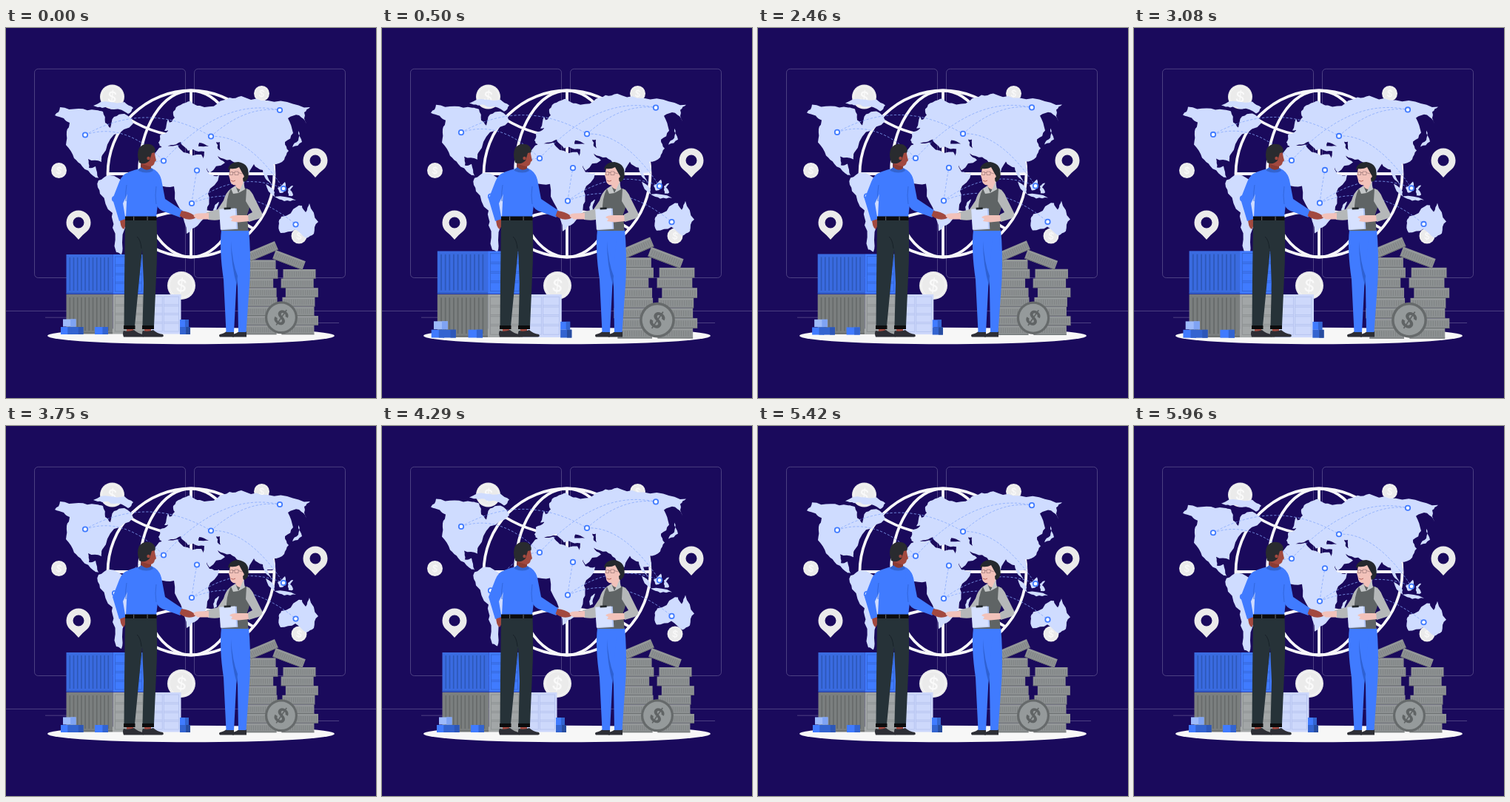
An HTML page with a canvas for the animation above (6 s loop, 500 by 500 pixels).

```html
<!DOCTYPE html>
<html lang="en">
<head>
<meta charset="utf-8">
<title>Global trade</title>
<style>
html, body { margin: 0; width: 100%; height: 100%; overflow: hidden; background: #1a0a5c; }
canvas { display: block; width: 500px; height: 500px; }
</style>
</head>
<body>
<canvas id="stage"></canvas>
<script>
const cv = document.getElementById('stage');
const dpr = window.devicePixelRatio || 1;
cv.width = cv.height = 500 * dpr;
const c = cv.getContext('2d');

const NIGHT = '#1a0a5c', BLUE = '#407bff', DEEP = '#3364d0', PALE = '#cfdcff';
const INK = '#263238', BLACK = '#0c0c0e', BROWN = '#a2493f', PINK = '#f2c2ba';
const SHOE = '#2d2e35', HAIR = '#24292e', SLEEVE = '#b5b8b9', VEST = '#5f6465';
const LOOP = 6000, FLOAT = 3000, ROW = 12.6;

// ---------- helpers ----------
function fill(color, d) {
  c.fillStyle = color;
  c.fill(typeof d === 'string' ? new Path2D(d) : d, 'evenodd');
}
function line(color, width, d) {
  c.strokeStyle = color;
  c.lineWidth = width;
  c.stroke(new Path2D(d));
}
function rect(color, x, y, w, h) {
  c.fillStyle = color;
  c.fillRect(x, y, w, h);
}
function oval(x, y, rx, ry) {
  c.beginPath();
  c.ellipse(x, y, rx, ry, 0, 0, 7);
}
function disc(color, x, y, rx, ry = rx) {
  c.fillStyle = color;
  oval(x, y, rx, ry);
  c.fill();
}
function ring(color, width, x, y, rx, ry = rx) {
  c.strokeStyle = color;
  c.lineWidth = width;
  oval(x, y, rx, ry);
  c.stroke();
}
function turned(x, y, angle, draw) {
  c.save();
  c.translate(x, y);
  c.rotate(angle);
  draw();
  c.restore();
}
function zoomed(x, y, s, draw) {
  c.save();
  c.translate(x, y);
  c.scale(s, s);
  c.translate(-x, -y);
  draw();
  c.restore();
}
function dollar(color, x, y, size, angle, weight) {
  turned(x, y, angle, () => {
    c.fillStyle = color;
    c.font = `${weight} ${size}px Inter, Arial, sans-serif`;
    c.textAlign = 'center';
    c.fillText('$', 0, size * 0.36);
  });
}

// ---------- motion ----------
// The map drifts up 10 px and back at a steady pace
const floatY = t => 10 * Math.abs(2 * (t % FLOAT) / FLOAT - 1) - 10;

// Two beats per loop: quick swell to 1.1, slower return
function beat(t) {
  const p = t / LOOP;
  const rise = p < 0.25 ? p / 0.1 : (p - 0.4) / 0.1;
  const fall = p < 0.35 ? (0.3 - p) / 0.2 : (0.6 - p) / 0.1;
  return 1 + 0.1 * Math.max(0, Math.min(rise, fall, 1));
}

// ---------- map ----------
let seed = 7;
const rnd = () => (seed = (seed * 16807) % 2147483647) / 2147483647 - 0.5;

// Splits each edge at a shifted midpoint to make a ragged coast
function edge(path, x, y, u, v, depth) {
  if (!depth) return path.lineTo(u, v);
  const bend = rnd() * 0.28;
  const mx = (x + u) / 2 + (v - y) * bend, my = (y + v) / 2 - (u - x) * bend;
  edge(path, x, y, mx, my, depth - 1);
  edge(path, mx, my, u, v, depth - 1);
}
function coast(text) {
  const pts = text.split(' ').map(p => p.split(',').map(Number));
  const path = new Path2D();
  path.moveTo(...pts[0]);
  pts.forEach((p, i) => edge(path, ...p, ...pts[(i + 1) % pts.length], 2));
  return path;
}
const LAND = {
  northAmerica: '66,118 73,107 98,109 122,111 131,113 134,128 141,135 146,120 160,116 172,129 146,144 130,172 129,181 111,177 112,189 121,187 125,203 118,200 103,187 92,176 81,158 82,140 86,128 78,122',
  arctic: '118,105 140,100 160,100 172,108 165,116 146,110 130,108',
  southAmerica: '125,206 140,199 160,211 184,229 176,253 157,290 156,306 149,303 144,270 144,250 127,224',
  africa: '207,162 232,158 240,168 264,171 275,198 288,199 273,224 272,242 259,267 244,278 236,246 227,214 206,214 190,194',
  madagascar: '282,240 288,235 285,249 281,251',
  britain: '214,139 219,123 224,136',
  eurasia: '206,155 208,145 219,139 218,130 228,121 226,113 236,104 250,99 262,105 286,102 302,94 318,92 345,98 380,100 411,107 403,114 406,130 396,118 381,122 388,142 377,154 382,166 376,178 361,184 364,197 353,199 359,211 351,204 347,192 335,184 324,203 315,187 303,178 286,173 296,182 275,196 267,178 268,167 253,164 246,166 236,154 223,158 211,162',
  japan: '395,139 400,154 387,161 395,152',
  sumatra: '351,211 363,222 363,228',
  java: '363,228 392,233 376,234',
  borneo: '367,216 377,208 378,220 370,223',
  sulawesi: '381,217 388,213 384,219 388,226 382,227',
  australia: '369,264 372,255 394,241 400,240 405,249 410,237 422,262 416,278 406,284 391,272 371,277',
};
const SHORES = Object.values(LAND).map(coast);
const BLACK_SEA = coast('260,160 261,155 274,160');
const CASPIAN = coast('284,154 289,154 290,166 286,163');

const NODES = { america: [107, 144.5], europe: [277, 146.5], siberia: [370, 111], brazil: [147, 231],
  mali: [213, 179.5], sudan: [258, 192.5], congo: [251, 237], borneo: [375, 217], oz: [391.5, 265.5] };
const ROUTES = [['america', 'europe', 49], ['america', 'mali', 36], ['mali', 'siberia', 52],
  ['europe', 'siberia', 24], ['europe', 'borneo', 38], ['brazil', 'mali', 26], ['congo', 'sudan', 4],
  ['congo', 'borneo', 36], ['congo', 'oz', 44]];

function worldMap() {
  SHORES.forEach(p => fill(PALE, p));
  fill(NIGHT, BLACK_SEA);
  fill(NIGHT, CASPIAN);
  c.setLineDash([3.2, 2.2]);
  for (const [from, to, lift] of ROUTES) {
    const [x, y] = NODES[from], [u, v] = NODES[to];
    line('#86a9fb', 0.8, `M${x} ${y}Q${(x + u) / 2} ${(y + v) / 2 - lift} ${u} ${v}`);
  }
  c.setLineDash([]);
  for (const [x, y] of Object.values(NODES)) {
    disc(BLUE, x, y, 4.1);
    disc('#fff', x, y, 2.3);
  }
}

// ---------- backdrop ----------
function paleCoin(x, y, r) {
  disc('#ebebeb', x, y, r);
  ring('#f5f5f5', r * 0.07, x, y, r * 0.85);
  dollar('#fafafa', x, y, r * 1.2, 0.12, 500);
}
function pin(x, y) {
  fill('#ebebeb', `M${x} ${y + 23}q-5 -6 -12 -11.700a16.500 16.500 0 1 1 24 0q-7 5.700 -12 11.700Z
    M${x - 7.5} ${y}a7.5 7.5 0 0 0 15 0a7.5 7.5 0 0 0 -15 0Z`);
}
function globe(color) {
  ring(color, 3.8, 250, 197, 112.5);
  ring(color, 3.8, 250, 197, 70, 112.5);
  line(color, 3.8, 'M250 84V310M137 197H363M166 123Q205 147 250 147T334 123M166 271Q205 247 250 247T334 271');
}
function backdrop() {
  rect(NIGHT, 0, 0, 500, 500);
  for (const x of [38.5, 254.5]) {
    c.beginPath();
    c.roundRect(x, 55.3, 204, 282.2, 5);
    c.strokeStyle = '#5a4f8c';
    c.lineWidth = 0.8;
    c.stroke();
  }
  line('#5a4f8c', 0.8, 'M0 382.4H500M53 391.2H86M400 398.5H450');
  globe('#f7f7f9');
  paleCoin(143.5, 93, 16.5);
  paleCoin(345.5, 88.5, 10.5);
  paleCoin(71.5, 192.5, 10.5);
  paleCoin(396, 281, 10.5);
  paleCoin(237, 348, 19);
  pin(418, 179);
  pin(98, 263);
}

// ---------- cargo ----------
function side(x, y, base, dark) {
  rect(base, x, y, 63, 53.5);
  for (let i = 4; i < 60; i += 5.2) rect(dark, x + i, y + 4, 1.6, 45);
  rect(dark, x, y + 51.5, 63, 1);
}
function doors(x, y, w, base, seam) {
  rect(base, x, y, w, 53.5);
  c.strokeStyle = seam;
  c.lineWidth = 0.8;
  const half = w / 2 - 4;
  for (const left of [x + 3, x + w / 2 + 1]) {
    c.strokeRect(left, y + 3, half, 47);
    for (let row = 1; row < 4; row++) {
      const h = y + 3 + row * 11.75;
      line(seam, 0.8, `M${left} ${h - 1}h${half}m0 2h${-half}`);
    }
  }
}
function box(x, y, w, front, flank) {
  rect(front, x, y, w, 10);
  rect(flank, x + w * 0.58, y, w * 0.42, 10);
}
function cargo() {
  doors(188, 360, 48.5, '#cdd8fb', '#b3c1ee');
  side(81.5, 306, '#3a6be0', '#2d58b8');
  doors(144.5, 306, 42, BLUE, DEEP);
  side(81.5, 360, '#7b7f7f', '#666a6a');
  doors(144.5, 360, 43.5, '#a2a6a7', '#8a8e90');
  box(77, 393.5, 17.5, '#9dbafb', '#7fa3f3');
  box(74, 404, 16, BLUE, DEEP);
  box(88.5, 404, 16, DEEP, '#2d57b8');
  box(120, 404, 18, BLUE, DEEP);
  box(235, 394, 12, BLUE, DEEP);
  box(235, 404, 14, DEEP, '#274c9f');
}

// ---------- money ----------
function slab(x, y, w) {
  rect('#8d9192', x, y, w, ROW);
  for (let i = 3; i < w - 2; i += 2.9) rect('#7d8182', x + i, y + 3, 0.8, 6.8);
  rect('#9da1a2', x + 1, y + 1.2, w - 2, 0.8);
  rect('#6b6f70', x, y + ROW - 0.9, w, 0.9);
}
function stack(x, y, w, rows, sway) {
  for (let i = 0; i < rows; i++) slab(x + sway * Math.sin(i * 2.2), y + i * ROW, w);
}
function money() {
  stack(321.5, 313.4, 43, 8, 3.5);
  stack(374.5, 326, 44, 7, -3.5);
  turned(347, 301.5, -0.4, () => slab(-20, -6.3, 40));
  turned(382.5, 313.5, 0.36, () => slab(-21.5, -6.3, 43));
  disc('#666a6b', 372, 391.3, 22);
  disc('#959a9b', 372, 391.3, 18.8);
  dollar('#606465', 372, 391.3, 27, 0.6, 700);
}

// ---------- people ----------
function man() {
  fill(BROWN, 'M154 257H162Q163 267 159 272Q154 269 154 257ZM163 405h9v6h-9zM187 405h9v6h-9z');
  for (const x of [159, 185]) fill(SHOE, `M${x} 409q7 2 14 -1q5 5 13 6q2 3 -1 3.500H${x}q-2 -5 0 -8.500Z`);
  fill(INK, 'M161 258H203.500Q205 300 203 335L200 403H184.500L186 345L184 299Q182 320 180 340L174 403H159.500L160 340Z');
  line('#172026', 0.9, 'M183 298Q182 286 177 282');
  rect(BLACK, 159, 402, 15.5, 5);
  rect(BLACK, 184, 402, 16, 5);
  fill(BLUE, 'M166 195Q157 197 153 208L144 231L153 261L161.500 258L158 237L166 220Z');
  fill(BLUE, 'M165 195Q175 191 182 190H198Q207 194 209 203L203 256H162Z');
  fill(BLUE, 'M199 194Q208 196 210 205L215 231L239 247L235.500 256L211 247Q203 243 202 233Z');
  line('#2f61d2', 0.8, 'M163 212Q161 222 162 234M203 214Q201 226 203 238');
  rect(BLACK, 161, 254.5, 42.5, 5.5);
  for (const x of [172, 190.5]) rect('#5a6065', x, 254.5, 1.2, 5.5);
  fill(BROWN, 'M237 247Q247 248 254 253Q259 256 253 258Q246 260 240 257L234.500 254Z');
  fill('#8a3b33', 'M183 178L182 191Q190 197 196 190V184Z');
  fill(BROWN, 'M188 162H199Q201 169 202 175L203 179L201 181Q200 187 194 187L184 184Z');
  fill('#292b2f', 'M180 182Q176 170 180 162Q186 155 196 157.500Q203 161 201.500 168L197 169L194 179Q190 184 183 183Z');
  disc(BROWN, 192.5, 176, 2.2);
  fill(DEEP, 'M179 191L183 188Q190 195 197 189L199 193Q190 198 179 193Z');
}
function woman() {
  for (const x of [289, 306]) fill(SHOE, `M${x + 10} 409l9 1v7.500H${x}q-2 -2 0 -3.500q6 -1 10 -5Z`);
  fill(BLUE, 'M306 273H328Q331 300 329.500 340L324.500 411H314L313 350Z');
  fill(BLUE, 'M291 273H318Q315 305 312 335L308 411H297.500L294 340Q288 300 291 273Z');
  fill('#2f61d2', 'M304 288Q304 320 312 348L313 335Q306 318 304 288Z');

  fill(HAIR, 'M300 190Q303 181 314 181Q327 183 327.500 195Q329 205 322 208L312 203Z');
  fill(PINK, 'M311 203H320L322 219Q314 226 310 217Z');
  fill(SLEEVE, 'M304 217Q297 222 294 233L286 245L271 249L273 259Q288 261 294 257L305 242Z');
  fill(VEST, 'M304 217L311 215Q316 221 322 216L330 219Q332 238 326 252L327.500 274H291L298 250Q297 230 304 217Z');
  fill('#c4c7c8', 'M304 217L310 213L314 223L307 224ZM314 223L321 208L323 218Z');
  fill(PINK, 'M303 190Q310 191 315 188L321 199Q319 210 311 212.500Q303 213 302.500 204L301 199Z');
  disc(PINK, 319.5, 200.5, 2.2);
  line('#8b6a6c', 0.6, 'M302.500 194.500h4v4h-4zM309 194h5v4.500h-5zM306.500 195.500h2.500M314 195.500L319 197');
  line('#a54b45', 0.8, 'M304 206Q307 208.500 310 206');

  fill(PINK, 'M274 250L260 250.500Q252 251 254 255L259 258.500H274Z');
  turned(300.5, 258, -0.06, () => {
    rect('#b3c6f5', -11, -13.5, 23, 28);
    rect('#d6e1ff', -11.5, -14, 21.5, 27.5);
    rect(HAIR, -5, -15.5, 9, 2.6);
  });
  fill(PINK, 'M329 253H313Q304 253 302 256L306 258L304 261L314 262.500L329 261Z');
  fill(SLEEVE, 'M325 217Q332 219 336 230L346 250Q347 256 341 258L328 262L327 252L333 249L324 234Z');
}

// ---------- loop ----------
function frame(t) {
  const s = beat(t);
  c.setTransform(dpr, 0, 0, dpr, 0, 0);
  backdrop();
  c.save();
  c.translate(0, floatY(t));
  worldMap();
  c.restore();
  disc('#f7f7f7', 250, 416, 194, 11.3);
  zoomed(161.3, 360, s, cargo);
  zoomed(372, 351.5, s, money);
  man();
  woman();
}
const start = performance.now();
function tick() {
  frame((performance.now() - start) % LOOP);
  requestAnimationFrame(tick);
}
tick();
</script>
</body>
</html>
```
